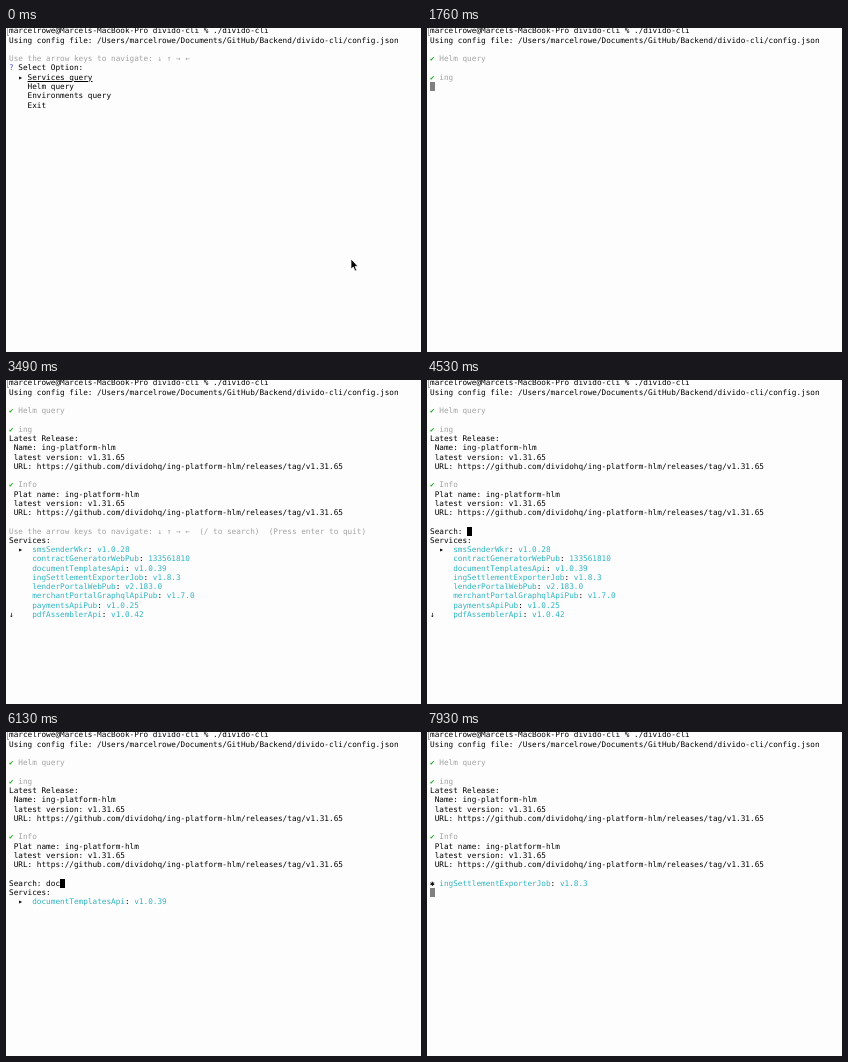
An HTML page for the animation above (8 s loop, 415x324 px).

```html
<!DOCTYPE html>
<html lang="en">
<head>
<meta charset="utf-8">
<title>Terminal session</title>
<style>
  html, body { margin: 0; width: 100%; height: 100%; overflow: hidden; background: #fefdfe; }
  #screen {
    position: absolute; left: 3px; top: -1.64px;
    font: 7.713px/9.28px "DejaVu Sans Mono", monospace;
    text-rendering: geometricPrecision;
    color: #000; white-space: pre;
  }
  #screen div { height: 9.28px; }
  .gray { color: #a3a3a3; }
  .green { color: #2aa62a; }
  .blue { color: #4a4ac8; }
  .cyan { color: #2fb4c0; }
  .cursor { display: inline-block; width: 4.64px; height: 9.28px; vertical-align: top; background: #808080; }
  .dark { background: #000; }
  #mark { position: absolute; left: 1px; top: -1px; width: 1px; height: 8px; border: solid #aaa; border-width: 0 0 1px 1px; }
  #pointer { position: absolute; left: 344px; top: 230px; }
</style>
</head>
<body>
<div id="screen"></div>
<div id="mark"></div>
<svg id="pointer" width="9" height="14">
  <path d="M1 1V11L3.3 9L5 13L6.7 12.3L5 8.4H8Z" stroke="#fff" stroke-width=".7"/>
</svg>
<script>
const LOOP = 8000;
const screen_ = document.getElementById("screen");
const pointer = document.getElementById("pointer");

const span = (cls, text = "") => `<span class="${cls}">${text}</span>`;
const done = text => span("green", "✔") + span("gray", " " + text);
const cursor = span("cursor");
const keys = "Use the arrow keys to navigate: ↓ ↑ → ←";
const help = span("gray", keys);
const listHelp = span("gray", keys + "  (/ to search)  (Press enter to quit)");
const search = text => "Search: " + text + span("cursor dark");

const menu = (label, options, active) => [
  help,
  span("blue", "?") + ` Select ${label}:`,
  ...options.map((o, i) => i === active ? `  ▸ <u>${o}</u>` : "    " + o)
];

const service = entry => {
  const [name, version] = entry.split(" ");
  return span("cyan", name) + ": " + span("cyan", version);
};
const list = (entries, active = 0) => ["Services:", ...entries.map((e, i) =>
  (i === 7 ? "↓" : " ") + (i === active ? " ▸  " : "    ") + service(e))];

const release = nameLabel => [
  ` ${nameLabel}: ing-platform-hlm`,
  " latest version: v1.31.65",
  " URL: https://github.com/dividohq/ing-platform-hlm/releases/tag/v1.31.65"
];

const all = [
  "smsSenderWkr v1.0.28", "contractGeneratorWebPub 133561810",
  "documentTemplatesApi v1.0.39", "ingSettlementExporterJob v1.8.3",
  "lenderPortalWebPub v2.183.0", "merchantPortalGraphqlApiPub v1.7.0",
  "paymentsApiPub v1.0.25", "pdfAssemblerApi v1.0.42"
];
const withD = [
  all[0], all[2], all[4], all[7],
  "auditLogReaderApi v1.0.19", "cloudsearchWriterWkr v1.2.3",
  "decisionEngineGraphqlApi v1.1.7", "indexRateApi v1.0.18"
];

// Each stage of the session extends the scrollback of the previous one
const start = [
  "marcelrowe@Marcels-MacBook-Pro divido-cli % ./divido-cli",
  "Using config file: /Users/marcelrowe/Documents/GitHub/Backend/divido-cli/config.json",
  ""
];
const helm = [...start, done("Helm query")];
const ing = [...helm, "", done("ing")];
const latest = [...ing, "Latest Release:", ...release("Name"), ""];
const info = [...latest, done("Info")];
const plat = [...info, ...release("Plat name"), ""];

const mainMenu = ["Services query", "Helm query", "Environments query", "Exit"];
const platforms = ["divido", "ing"];
const actions = ["Info", "Services", "History", "Exit"];
const browse = active => [...plat, listHelp, ...list(all, active)];
const find = (text, entries) => [...plat, search(text), ...list(entries)];

const timeline = [
  [0, [...start, ...menu("Option", mainMenu, 0)]],
  [440, [...start, ...menu("Option", mainMenu, 1)]],
  [1080, [...helm, cursor]],
  [1120, [...helm, "", ...menu("Platform", platforms, 0)]],
  [1480, [...helm, "", ...menu("Platform", platforms, 1)]],
  [1760, [...ing, cursor]],
  [2090, [...latest, ...menu("Option", actions, 0)]],
  [3090, [...info, cursor]],
  [3450, [...plat, cursor]],
  [3490, browse(0)],
  [4530, find("", all)],
  [5650, find("d", withD)],
  [5770, find("do", [all[2]])],
  [5850, find("doc", [all[2]])],
  [6850, browse(0)],
  [7490, browse(1)],
  [7650, browse(2)],
  [7730, browse(3)],
  [7930, [...plat, "✱ " + service(all[3]), cursor]]
];

let shown;
function draw() {
  const t = performance.now() % LOOP;
  const state = timeline.findLast(([at]) => at <= t);
  if (state !== shown) {
    shown = state;
    screen_.innerHTML = state[1].map(line => `<div>${line}</div>`).join("");
    pointer.style.display = state === timeline[0] ? "block" : "none";
  }
  requestAnimationFrame(draw);
}
draw();
</script>
</body>
</html>
```
